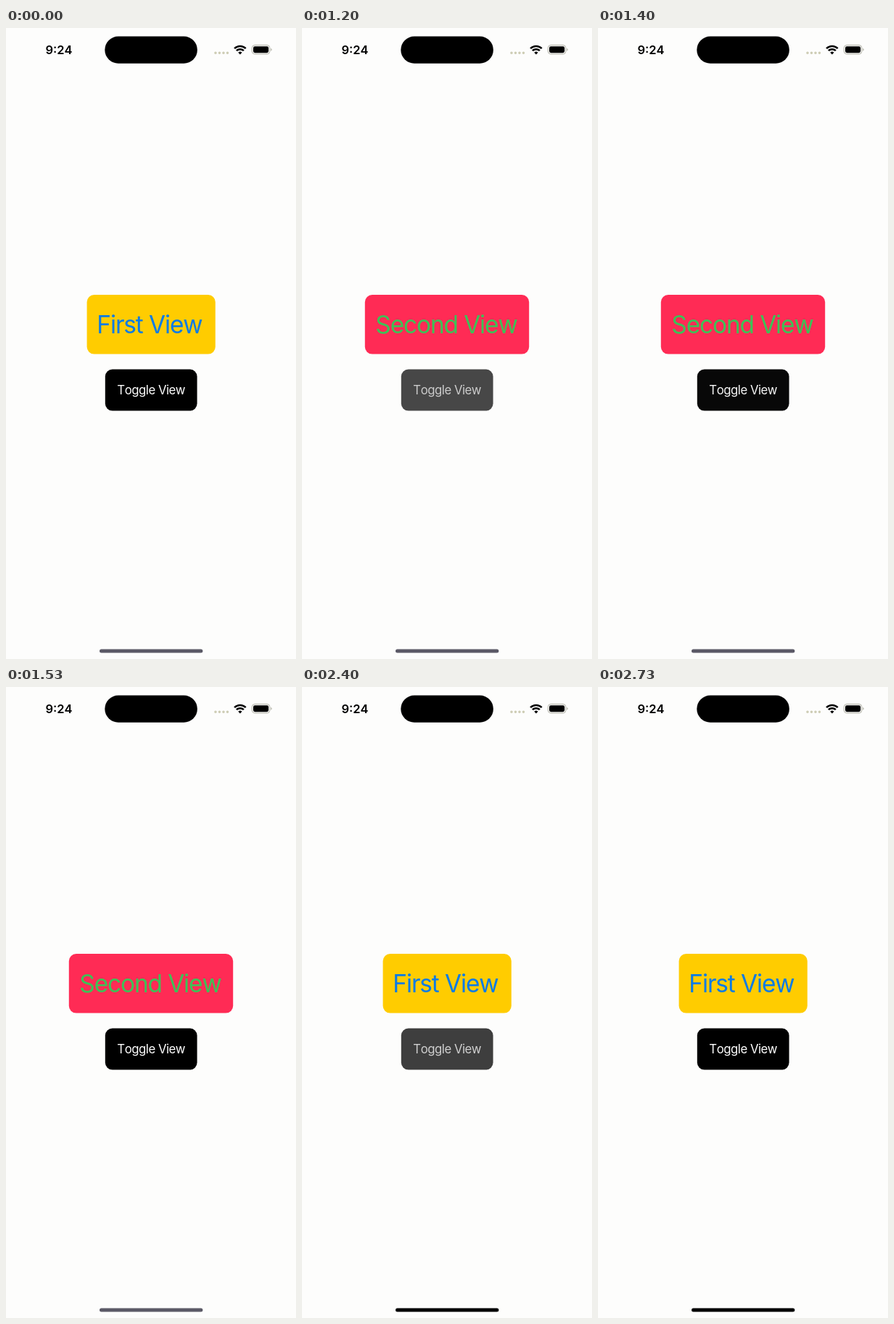
Recreate the animation shown at these times as an HTML page. Size 400 by 868 pixels, loop 3.19 s.

```html
<!DOCTYPE html>
<html lang="en">
<head>
<meta charset="utf-8">
<title>Toggle View</title>
<style>
  html, body { margin: 0; width: 100%; height: 100%; overflow: hidden; background: #fdfdfc; }
  svg { display: block; width: 400px; height: 868px; }
  text {
    font-family: Inter, sans-serif;
    font-kerning: none;
    font-optical-sizing: none;
    text-anchor: middle;
  }
  .title { font-size: 33.4px; letter-spacing: -0.033em; }
  .label { font-size: 16.8px; letter-spacing: -0.03em; }
  .clock { font-size: 16.5px; font-weight: 600; }
</style>
</head>
<body>
<svg viewBox="0 0 400 868">
  <!-- status bar -->
  <text class="clock" x="73" y="36">9:24</text>
  <rect x="136.3" y="11.5" width="127.6" height="37.2" rx="18.6"/>
  <path d="M289 34.3h17" stroke="#cdccb4" stroke-width="3.6" stroke-linecap="round" stroke-dasharray="0 5.5"/>
  <g fill="none" stroke="#000" stroke-width="2.5">
    <path d="M315.1 28.2a11.2 11.2 0 0 1 15.6 0"/>
    <path d="M317.9 31.2a7.1 7.1 0 0 1 10 0"/>
  </g>
  <path d="M322.9 36.4l-2.6-2.6a3.7 3.7 0 0 1 5.2 0z"/>
  <rect x="339.3" y="23.5" width="24.6" height="12.4" rx="3.9" fill="none" stroke="#b2b2a6"/>
  <rect x="341" y="25.2" width="21.2" height="9" rx="2.4"/>
  <path d="M365.3 27.7q3 2 0 4z" fill="#b2b2a6"/>

  <g id="first">
    <rect x="111.6" y="367" width="177.2" height="81.6" rx="10" fill="#ffcc00"/>
    <text class="title" x="197.9" y="420.4" fill="#0a7be6">First View</text>
  </g>
  <g id="second">
    <rect x="86.8" y="367" width="226.4" height="81.6" rx="10" fill="#ff2b55"/>
    <text class="title" x="199" y="420.4" fill="#3cc257">Second View</text>
  </g>
  <rect id="button" x="136.8" y="469.6" width="126.8" height="57" rx="10"/>
  <text id="label" class="label" x="200.2" y="504.2" fill="#fff">Toggle View</text>
  <rect id="home" x="129" y="854.6" width="142.4" height="5" rx="2.5"/>
</svg>
<script>
  const LOOP = 3190, TAP_1 = 1070, TAP_2 = 2270;
  const STEPS = [0, 60, 130, 200, 260, 330, 400, 460];
  const el = id => document.getElementById(id);
  const [first, second, button, label, home] =
    ['first', 'second', 'button', 'label', 'home'].map(el);

  // Critically damped spring from the pressed opacity back to full.
  function release(since, lead) {
    const step = STEPS.filter(s => s <= since).pop();
    if (step === 460) return 1;
    const x = 0.014 * (step + lead);
    return 1 - 0.8 * (1 + x) * Math.exp(-x);
  }

  function draw(t) {
    const toggled = t >= TAP_1 && t < TAP_2;
    first.style.display = toggled ? 'none' : '';
    second.style.display = toggled ? '' : 'none';
    // The label fades on its own, over the fading button.
    button.style.opacity = label.style.opacity = t < TAP_1 ? 1
      : toggled ? release(t - TAP_1, 28) : release(t - TAP_2, 42);
    home.style.fill = t < TAP_2 ? '#5b5966' : '#000';
  }

  const start = performance.now();
  function frame() {
    draw((performance.now() - start) % LOOP);
    requestAnimationFrame(frame);
  }
  frame();
</script>
</body>
</html>
```
